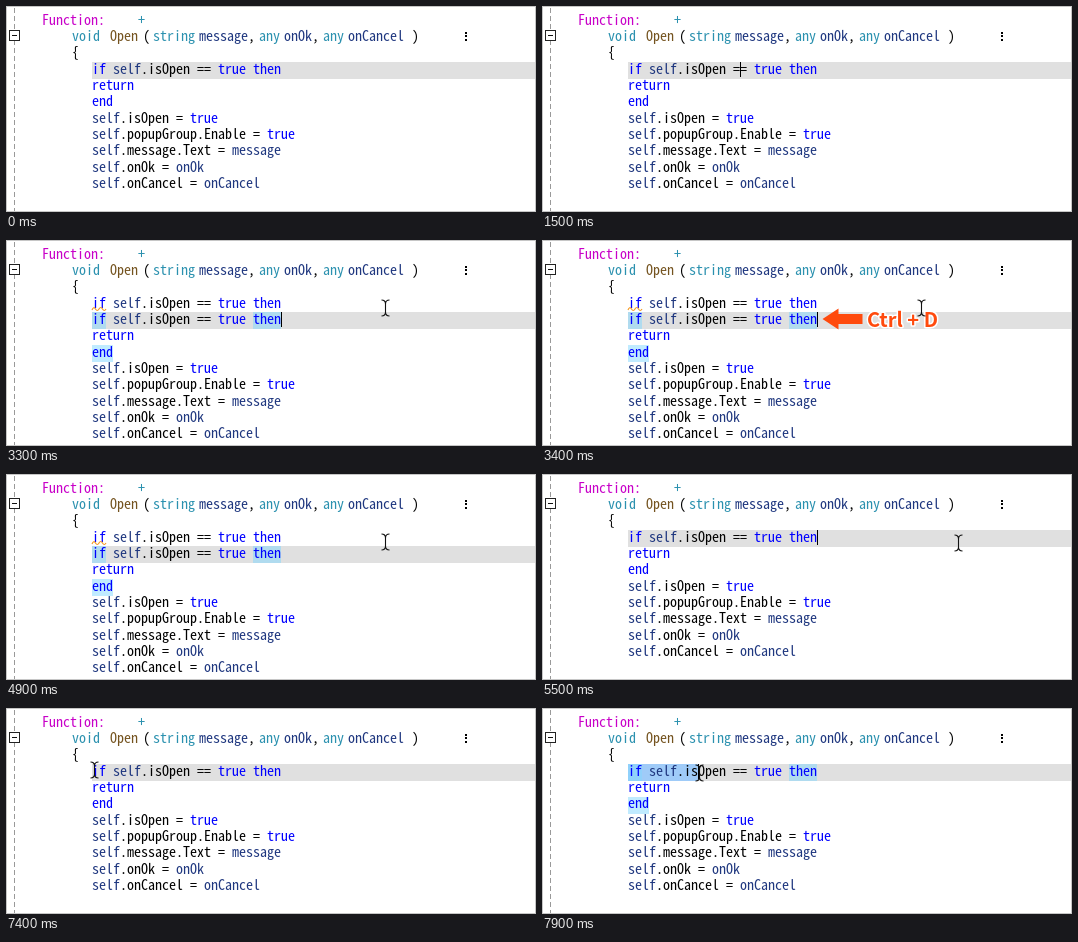
These frames come from a looping animation (530 by 206 pixels, 8 s). An HTML page:

```html
<!DOCTYPE html>
<html lang="en">
<head>
<meta charset="utf-8">
<title>Duplicate line shortcut</title>
<style>
  html, body { margin: 0; width: 100%; height: 100%; overflow: hidden; background: #fff; }
  svg { display: block; }
  #code { font-family: "Noto Sans Mono CJK JP", "Noto Sans Mono CJK KR", "Noto Sans Mono CJK SC", "Noto Sans Mono", monospace; white-space: pre; }
  .key { fill: #0000ff; }
  .var { fill: #1f377f; }
  .type { fill: #2b91af; }
  .func { fill: #74531f; }
  .head { fill: #c800c8; }
  .op { fill: #000; }
  .pair { fill: rgba(130, 215, 255, .5); }
  .label { font: bold 20px "Noto Sans CJK JP", "Noto Sans CJK KR", "Noto Sans", sans-serif; }
</style>
</head>
<body>
<svg width="530" height="206" viewBox="0 0 530 206">
  <rect width="530" height="206" fill="#fff"/>
  <rect id="band" x="86" width="443" height="17" fill="#e0e0e0"/>
  <rect id="selection" x="86" y="56" height="17" fill="#9fcbf8"/>
  <g id="pairs">
    <rect class="pair" x="86" width="14" height="17"/>
    <rect class="pair" x="247" width="28" height="17"/>
    <rect class="pair" id="endPair" x="86" width="21" height="17"/>
  </g>
  <path d="M8.5 2V205" stroke="#999" stroke-dasharray="5 3"/>
  <rect x="3.5" y="24.5" width="10" height="10" fill="#fff" stroke="#222"/>
  <path d="M6 29.5H11" stroke="#111"/>
  <path d="M459 26h2v2h-2zM459 29h2v2h-2zM459 33h2v2h-2z"/>
  <g id="code"></g>
  <path id="squiggle" d="M86 70q1.75 -4 3.5 -1t3.5 0t3.5 0t3.5 0" fill="none" stroke="#f59a23" stroke-width="1.2"/>
  <rect id="caret" width="1" height="15"/>
  <g id="label" fill="#ff4a0d">
    <path d="M280.5 79L296.5 68.5V74H320.5V84H296.5V89.5Z"/>
    <text class="label" x="325" y="87" stroke="#fff" stroke-width="3" stroke-linejoin="round" paint-order="stroke">Ctrl + D</text>
  </g>
  <path id="arrow" d="M0 0V16.5L3.8 13L6.6 19.2L9.6 17.9L6.9 12H12Z" stroke="#fff" stroke-width=".8"/>
  <path id="beam" d="M-4 -8Q0 -8 0 -4Q0 -8 4 -8M0 -5V5M-4 8Q0 8 0 4Q0 8 4 8" fill="none" stroke="#111" stroke-width="1.1"/>
  <rect x=".5" y=".5" width="529" height="205" fill="none" stroke="#c6c6c6"/>
</svg>
<script>
const NS = "http://www.w3.org/2000/svg";
const $ = id => document.getElementById(id);
const LOOP = 8000, STEP = 100, CHAR = 7, LEFT = 86, PITCH = 16.33;
const baseline = row => Math.round(18.8 + PITCH * row);
const rowTop = row => Math.round(7 + PITCH * row);
const move = (el, x, y) => el.setAttribute("transform", `translate(${x} ${y})`);
const show = (id, on) => $(id).style.display = on ? "" : "none";

// Adds a row of "kind:string" tokens, each followed by a gap unless a comma comes next.
function line(row, x, tokens, gap = 0) {
  const group = document.createElementNS(NS, "g");
  tokens.forEach((token, i) => {
    const cut = token.indexOf(":");
    const el = document.createElementNS(NS, "text");
    el.setAttribute("x", x);
    el.setAttribute("class", token.slice(0, cut));
    el.textContent = token.slice(cut + 1);
    x += el.textContent.length * CHAR + (tokens[i + 1] === "op:," ? 0 : gap);
    group.append(el);
  });
  move(group, 0, baseline(row));
  $("code").append(group);
  return group;
}

const condition = row =>
  line(row, LEFT, ["key:if ", "var:self", "op:.isOpen == ", "key:true then"]);

line(0, 36, ["head:Function:", "type:+"], 33);
line(1, 66, ["type:void", "func:Open"], 10);
line(1, 137, ["op:("]);
line(1, 147, ["type:string", "var:message", "op:,", "type:any", "var:onOk", "op:,",
  "type:any", "var:onCancel"], 4);
line(1, 406, ["op:)"]);
line(2, 66, ["op:{"]);
condition(3);
const copy = condition(4);
const rest = [
  ["key:    return"],
  ["key:end"],
  ["var:self", "op:.isOpen = ", "key:true"],
  ["var:self", "op:.popupGroup.Enable = ", "key:true"],
  ["var:self", "op:.message.Text = ", "var:message"],
  ["var:self", "op:.onOk = ", "var:onOk"],
  ["var:self", "op:.onCancel = ", "var:onCancel"]
].map((tokens, i) => line(4 + i, LEFT, tokens));

// Pick the font size that gives one column per CHAR pixels.
const pen = document.createElement("canvas").getContext("2d");
pen.font = "100px " + getComputedStyle($("code")).fontFamily;
$("code").style.fontSize = CHAR * 100 / pen.measureText("n").width + "px";

const moves = [
  { from: 1500, to: 2200, x: 384, y: 62 },
  { from: 2600, to: 2700, x: 379, y: 68 },
  { from: 4900, to: 5100, x: 416, y: 69 },
  { from: 5800, to: 6000, x: 444, y: 69 },
  { from: 6200, to: 7600, x: 87, y: 62 },
  { from: 7700, to: 7900, x: 157, y: 65 }
];

function pointer(t) {
  let x = 350, y = 160;
  for (const m of moves) {
    const left = 1 - Math.min(1, Math.max(0, (t - m.from) / (m.to - m.from)));
    const k = 1 - left ** 3;
    x += (m.x - x) * k;
    y += (m.y - y) * k;
  }
  return [Math.round(x), Math.round(y)];
}

function draw(time) {
  const t = Math.floor(time % LOOP / STEP) * STEP;
  const within = (from, to) => t >= from && t < to;
  const blink = start => (t - start) % 1030 < 500;
  const doubled = within(3300, 5400);
  const row = doubled ? 4 : 3;

  $("band").setAttribute("y", rowTop(row));
  copy.style.display = doubled ? "" : "none";
  rest.forEach((group, i) => move(group, 0, baseline(row + 1 + i)));
  show("squiggle", doubled);
  show("label", within(3400, 4900));

  show("pairs", within(2900, 5500) || t >= 7700);
  move($("pairs"), 0, rowTop(row));
  $("endPair").setAttribute("y", rowTop(row + 2) - rowTop(row));

  const [x, y] = pointer(t);
  show("arrow", within(1600, 2300));
  show("beam", t >= 2300);
  move($("arrow"), x, y);
  move($("beam"), x + .5, y);

  const selected = t < 7700 ? 0 : Math.round((x - LEFT) / CHAR);
  $("selection").setAttribute("width", selected * CHAR);

  const column = t < 2900 ? 16 : t < 7700 ? 27 : selected;
  show("caret", within(400, 2300) && blink(400) || within(2900, 4900) ||
    within(5400, 7700) && blink(5400) || t >= 7700);
  $("caret").setAttribute("x", LEFT + column * CHAR);
  $("caret").setAttribute("y", rowTop(row));
}

const start = performance.now();
function tick() {
  draw(performance.now() - start);
  requestAnimationFrame(tick);
}
tick();
</script>
</body>
</html>
```
